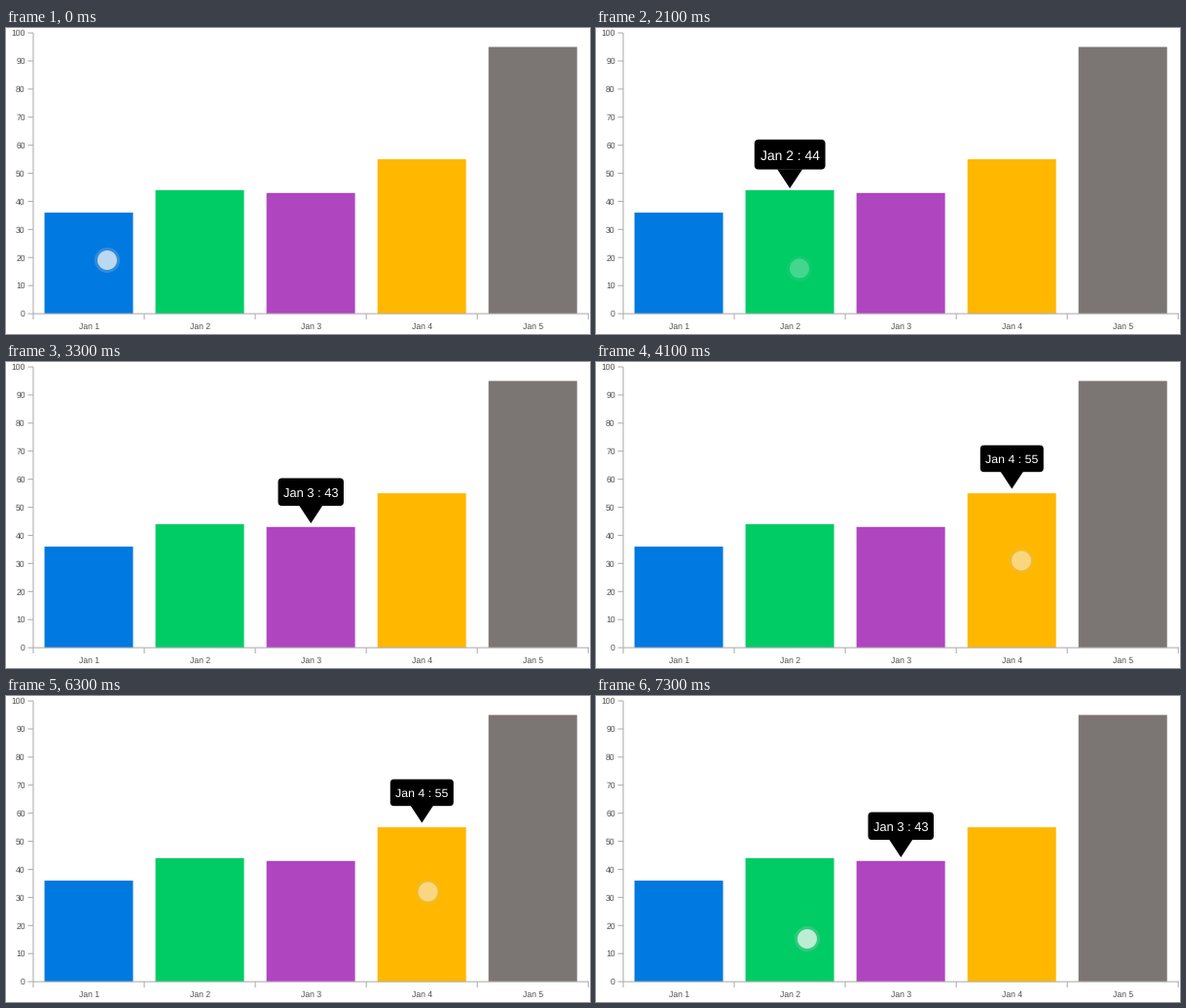
Write a matplotlib script that moves like this. It is 600 px wide and 315 px high and loops after 7400 ms.

```python
import matplotlib.pyplot as plt
from matplotlib.animation import FuncAnimation
from matplotlib.patches import Circle, FancyBboxPatch, Polygon, Rectangle
from matplotlib.transforms import Affine2D

W, H, DPI = 600, 315, 100
PX = 72 / DPI
STEP, FRAMES = 100, 74
POP_MS = 400
BASE, UNIT = 294.1, 2.8905
AXIS_X, SLOT, BAR_W = 28, 114.05, 91

VALUES = [36, 44, 43, 55, 95]
COLORS = ["#0079e0", "#00cc66", "#b045c0", "#ffb700", "#7b7674"]

# touch start, touch end, x, y
TOUCHES = [
    (0, 300, 104, 239),
    (1800, 2200, 209, 247.5),
    (2600, 3300, 320, 229.5),
    (3900, 4500, 437, 204.5),
    (5100, 5600, 549, 188),
    (6100, 6600, 433.5, 201.5),
    (6800, 7200, 298.5, 234),
    (7300, 7800, 217, 250),
]
# tooltip start, bar index
POPS = [(1000, 0), (1820, 1), (2764, 2), (3964, 3),
        (5164, 4), (6164, 3), (6864, 2)]

plt.rcParams["font.family"] = "Liberation Sans"
plt.rcParams["text.hinting"] = "none"

fig = plt.figure(figsize=(W / DPI, H / DPI), dpi=DPI, facecolor="white")
ax = fig.add_axes([0, 0, 1, 1])
ax.set_xlim(0, W)
ax.set_ylim(H, 0)
ax.axis("off")


def y_of(value):
    return BASE - value * UNIT


def x_mid(i):
    return AXIS_X + SLOT * (i + 0.5)


def rule(xs, ys):
    ax.plot(xs, ys, color="#b0b0b0", lw=1.1 * PX, solid_capstyle="butt",
            snap=False, zorder=2)


def label(x, y, text, ha):
    ax.text(x, y, text, ha=ha, va="baseline", size=8.6 * PX, color="#505050")


def spring_out(x):
    u = min(x, 1) - 1
    return u * u * (2.70158 * u + 1.70158) + 1


# Chart
for i, (value, color) in enumerate(zip(VALUES, COLORS)):
    top = y_of(value)
    ax.add_patch(Rectangle((x_mid(i) - BAR_W / 2, top), BAR_W, BASE - top,
                           fc=color, lw=0, snap=False))
    label(x_mid(i) + 0.7, 310.2, f"Jan {i + 1}", "center")

rule([AXIS_X, AXIS_X], [y_of(100), BASE])
rule([AXIS_X, W - 1], [BASE, BASE])
for value in range(0, 101, 10):
    y = y_of(value)
    rule([22.5, AXIS_X], [y, y])
    label(19.7, y + 3.2, str(value), "right")
for i in range(6):
    x = AXIS_X + SLOT * i
    rule([x, x], [BASE, 300])

# Tooltip, drawn around its own centre with the tip pointing down
bubble = FancyBboxPatch((-33.7, -23.25), 67.4, 28.5, fc="black", lw=0,
                        boxstyle="round,pad=0,rounding_size=4",
                        snap=False, zorder=5)
tip = Polygon([(-12, 5), (12, 5), (0, 23.25)], fc="black", lw=0,
              snap=False, zorder=5)
for part in (bubble, tip):
    ax.add_patch(part)
caption = ax.text(0, 0, "", ha="center", va="baseline", color="white", zorder=6)
tooltip = (bubble, tip, caption)

# Touch marker
halo = Circle((0, 0), 13, fc="#c8c8c8", lw=0, zorder=7)
dot = Circle((0, 0), 10, fc="white", lw=0, zorder=8)
for part in (halo, dot):
    ax.add_patch(part)


def show_tooltip(t):
    active = [pop for pop in POPS if pop[0] <= t]
    for part in tooltip:
        part.set_visible(bool(active))
    if not active:
        return
    start, i = active[-1]
    scale = spring_out((t - start) / POP_MS)
    top = y_of(VALUES[i])
    inside = top < 50
    flip = -1 if inside else 1
    x = x_mid(i) + 0.1
    y = top + (27.5 if inside else -27)
    place = Affine2D().scale(scale, flip * scale).translate(x, y)
    for part in (bubble, tip):
        part.set_transform(place + ax.transData)
    caption.set_text(f"Jan {i + 1} : {VALUES[i]}")
    caption.set_fontsize(max(12.9 * scale * PX, 0.5))
    caption.set_position((x, y + scale * (5 - 9 * flip)))


def show_touch(t):
    now = [touch for touch in TOUCHES if touch[0] <= t < touch[1]]
    for part in (halo, dot):
        part.set_visible(bool(now))
    if not now:
        return
    start, end, x, y = now[0]
    alpha = 0.7 - 0.24 * min((t - start) / 200, 1)
    if end - t <= STEP:
        alpha *= 0.5
    for part, strength in ((halo, 0.36), (dot, 0.95)):
        part.center = x, y
        part.set_alpha(alpha * strength)


def draw(frame):
    t = frame * STEP
    show_tooltip(t)
    show_touch(t)
    return (*tooltip, halo, dot)


anim = FuncAnimation(fig, draw, frames=FRAMES, interval=STEP,
                     repeat=True, repeat_delay=0, blit=False)
plt.show()
```
